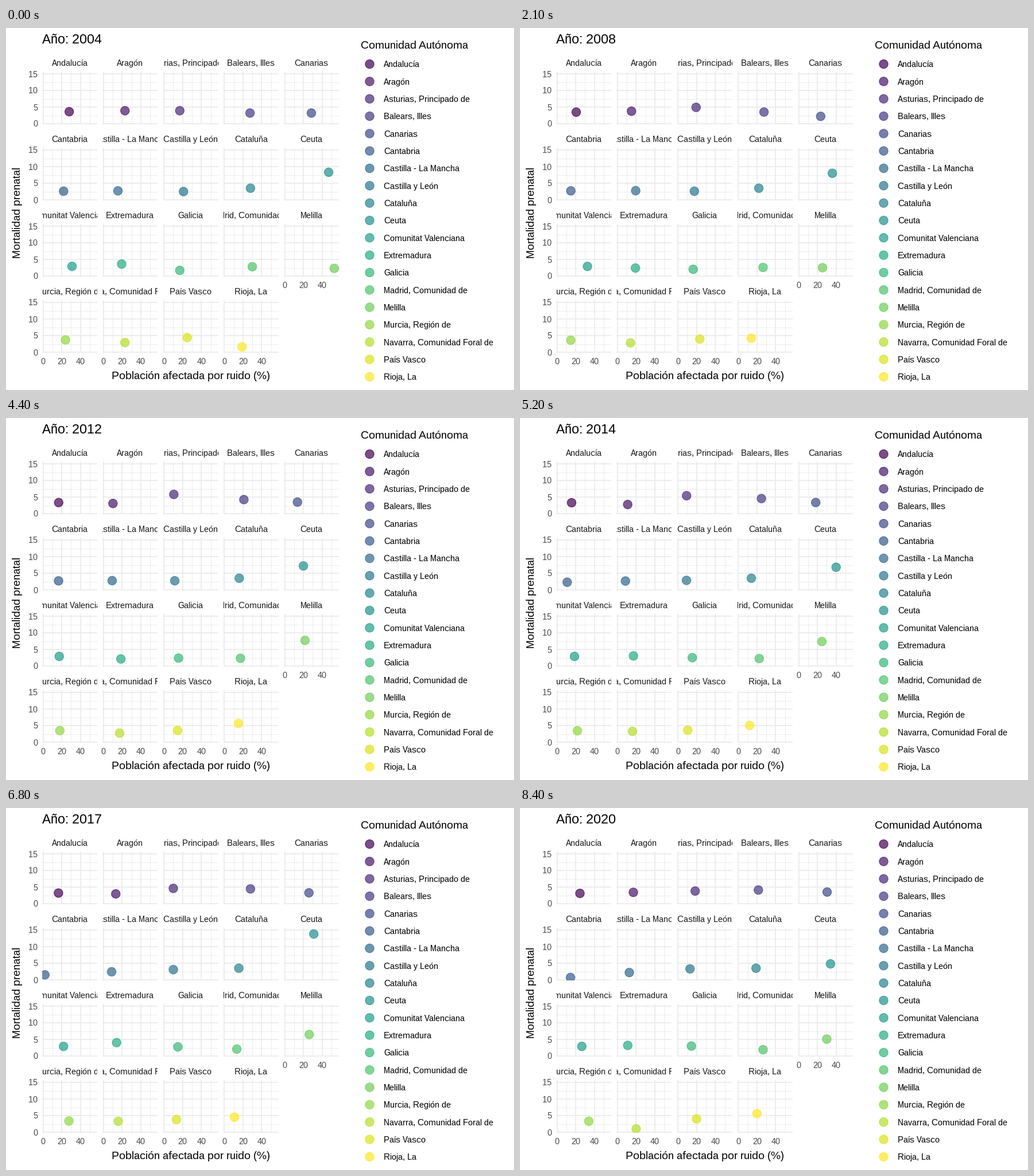
Animation, 885 px wide and 632 px high, one loop 8.5 s. Source, as a matplotlib script:

```python
import numpy as np
import matplotlib.pyplot as plt
from matplotlib.animation import FuncAnimation
from matplotlib.patches import Circle, Rectangle

W, H, DPI = 885, 632, 64
PT = 72 / DPI  # points per pixel
FRAMES, REGIONS = 85, 19
SMALL, MEDIUM, LARGE = 15, 19, 23
plt.rcParams.update({
    "font.family": "Liberation Sans",
    "text.hinting": "native",
    "text.hinting_factor": 1,
})

fig = plt.figure(figsize=(W / DPI, H / DPI), dpi=DPI, facecolor="white")
ax = fig.add_axes([0, 0, 1, 1])
ax.set_xlim(0, W)
ax.set_ylim(H, 0)
ax.axis("off")


def label(x, y, s, size, color="black", **kw):
    return ax.text(x, y, s, fontsize=size * PT, color=color,
                   va="baseline", **kw)


def line(xs, ys, width):
    ax.plot(xs, ys, color="#EBEBEB", lw=width * PT, snap=True,
            solid_capstyle="butt", zorder=1)


def box(x0, y0, x1, y1):
    return Rectangle((x0, y1), x1 - x0, y0 - y1, transform=ax.transData)


def dot(x, y, color):
    rgba = (*color[:3], 0.7)
    return ax.add_patch(Circle((x, y), 7.6, facecolor=rgba, edgecolor=rgba,
                               lw=1.2 * PT, zorder=3))


def x_pos(i, v):
    return 64.5 + 105.25 * (i % 5) + 1.63 * v


def y_pos(i, v):
    return 167 + 133 * (i // 5) - 5.8 * v


def track(values):
    """Linear path through key values spread evenly over the loop."""
    keys = np.linspace(0, FRAMES - 1, len(values))
    return np.interp(np.arange(FRAMES), keys, values)


def panel(i, name):
    left, base = x_pos(i, 0) - 1.5, y_pos(i, 0)
    right, top, bottom = left + 96, base - 91, base + 1
    for first, width in ((1, 0.85), (0, 1.7)):
        for k in range(first, 7, 2):
            line([left, right], [y_pos(i, 2.5 * k)] * 2, width)
        for k in range(first, 6, 2):
            line([x_pos(i, 10 * k)] * 2, [top, bottom], width)

    strip = label(left + 48, base - 101, name, SMALL, "#1A1A1A",
                  ha="center", clip_on=True)
    strip.set_clip_path(box(left, base - 122, right, top))

    if i % 5 == 0:
        for v in range(0, 20, 5):
            label(55.5, y_pos(i, v) + 5.5, str(v), SMALL, "#4D4D4D", ha="right")
    if i + 5 >= REGIONS:
        for v in range(0, 60, 20):
            label(x_pos(i, v), base + 21, str(v), SMALL, "#4D4D4D", ha="center")
    return box(left, top, right, bottom)


dots, paths = [], []


def region(name, noise, mortality):
    i = len(dots)
    color = plt.cm.viridis(i / (REGIONS - 1))
    row = 63 + 30.33 * i
    dot(633.5, row, color)
    label(658, row + 5.5, name, SMALL)

    d = dot(0, 0, color)
    d.set_clip_path(panel(i, name))
    dots.append(d)
    paths.append((x_pos(i, track(noise)), y_pos(i, track(mortality))))


# Share of people affected by noise (%), then prenatal mortality
region("Andalucía", [28, 20.5, 17, 14, 24.5], [3.6, 3.1])
region("Aragón", [23, 15, 10, 12, 17], [3.9, 3.7, 2.6, 3.4])
region("Asturias, Principado de", [17, 19.5, 11, 7.5, 18.5], [3.9, 5.9, 3.8])
region("Balears, Illes", [27.5, 27.5, 20, 30, 21.5], [3.2, 3.6, 4.7, 4.1])
region("Canarias", [28.5, 23.5, 12.5, 24.5, 30.4], [3.2, 2.2, 3.5, 3.2, 3.5])
region("Cantabria", [22, 17.5, 12, 18, 8, 1, 14.4], [2.6, 2.8, 0.7])
region("Castilla - La Mancha", [15.5, 19.5, 9.5, 7.5, 12.7], [2.7, 2.8, 2.2])
region("Castilla y León", [21, 16.5, 8, 13], [2.5, 2.7, 3.3])
region("Cataluña", [28, 20, 13, 19], [3.5])
region("Ceuta", [47, 47, 25, 15, 50, 28, 34], [8.3, 8, 8, 7.3, 6.6, 15, 4.8])
region("Comunitat Valenciana", [31, 32.5, 17, 20.5, 26.5], [2.9])
region("Extremadura", [19.5, 19, 11], [3.6, 2.4, 1.9, 4.3, 3.2])
region("Galicia", [17, 14.5], [1.7, 3])
region("Madrid, Comunidad de", [30, 31, 22, 16, 25, 11.5, 26.5], [2.8, 1.9])
region("Melilla", [53, 55, 25.5, 19, 21, 25, 25.5, 27, 30], [2.3, 2.5, 7.8, 6.9, 5.1])
region("Murcia, Región de", [24, 33, 14.7, 12.5, 17, 22, 26, 29.5, 34], [3.7, 3.3])
region("Navarra, Comunidad Foral de", [23, 14, 17.5, 14.5, 20], [2.9, 2.8, 2.6, 4, 1])
region("País Vasco", [25, 23, 8.5, 20], [4.4, 3.5, 4])
region("Rioja, La", [19, 14, 16, 8, 20], [1.6, 4.2, 5.8, 4.2, 5.6])

title = label(63, 27, "", LARGE)
label(617.5, 36.5, "Comunidad Autónoma", MEDIUM)
label(321.5, 613, "Población afectada por ruido (%)", MEDIUM, ha="center")
label(25, 322, "Mortalidad prenatal", MEDIUM, ha="center",
      rotation=90, rotation_mode="anchor")


def draw(f):
    title.set_text(f"Año: {round(2004 + 16 * f / (FRAMES - 1))}")
    for d, (xs, ys) in zip(dots, paths):
        d.center = xs[f], ys[f]
    return [title, *dots]


anim = FuncAnimation(fig, draw, frames=FRAMES, interval=100,
                     init_func=lambda: draw(0), repeat=True, repeat_delay=0)
plt.show()
```
